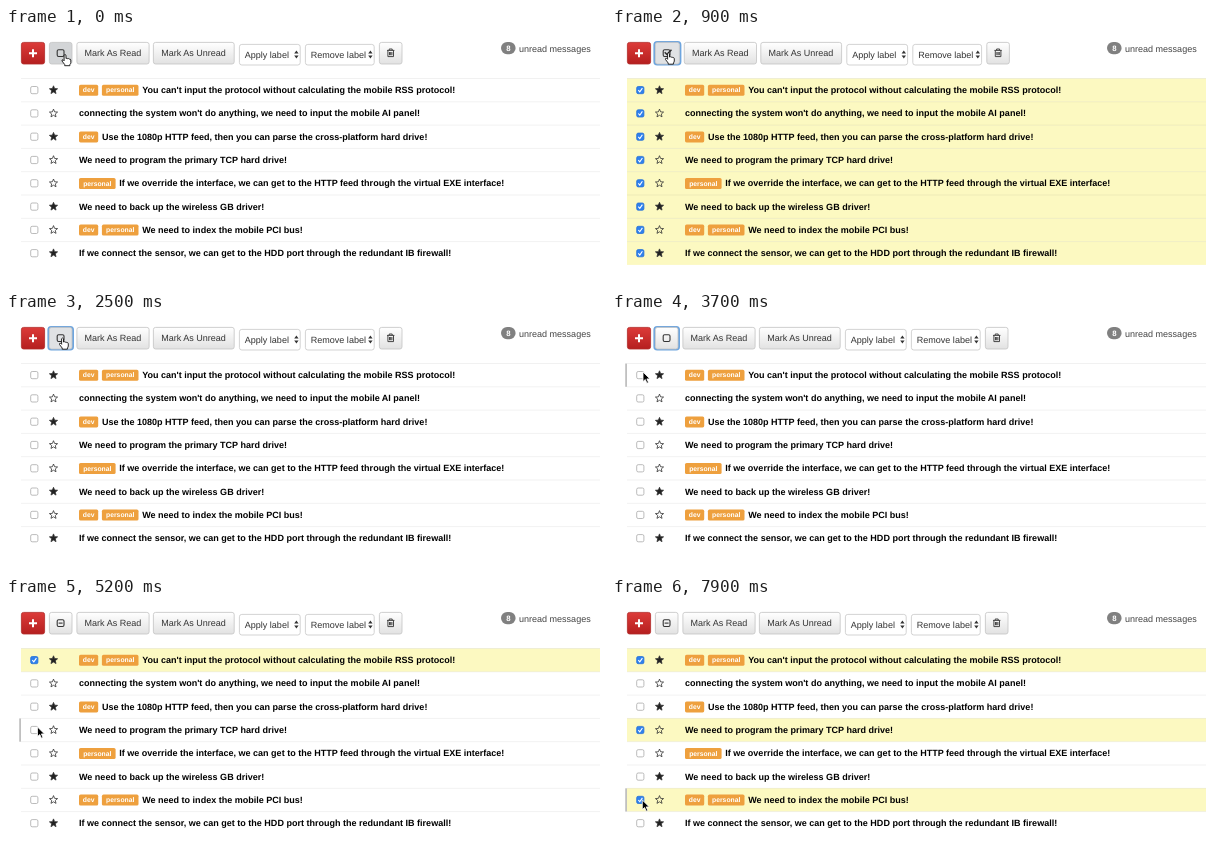
Write an HTML page that moves like this. It is 600 px wide and 257 px high and loops after 8 s.

```html
<!DOCTYPE html>
<html lang="en">
<head>
<meta charset="utf-8">
<title>Inbox</title>
<style>
html, body { margin: 0; width: 100%; height: 100%; overflow: hidden; background: #fff; }
svg { display: block; width: 600px; height: 257px; }
text { font: 9.03px "Liberation Sans", Arial, sans-serif; text-rendering: geometricPrecision; fill: #333; }
.subject { font-weight: bold; fill: #000; }
.tag { font-size: 6.77px; font-weight: bold; fill: #fff; }
.btn { fill: url(#grey); stroke: #c3c3c3; stroke-width: .8; }
.line { fill: none; stroke: #333; stroke-width: 1.1; stroke-linejoin: round; }
</style>
</head>
<body>
<svg viewBox="0 0 600 257">
  <defs>
    <linearGradient id="grey" x2="0" y2="1"><stop stop-color="#fff"/><stop offset="1" stop-color="#e2e2e2"/></linearGradient>
    <linearGradient id="red" x2="0" y2="1"><stop stop-color="#dc3b39"/><stop offset="1" stop-color="#b51f1f"/></linearGradient>
  </defs>
  <rect x="15.4" y="14.4" width="23.2" height="21.6" rx="2.2" fill="url(#red)" stroke="#b02a28" stroke-width=".8"/>
  <path d="M23 25.2h8M27 21.2v8" stroke="#fff" stroke-width="2"/>

  <rect id="ring" x="42.4" y="13.9" height="22.6" rx="2.8" fill="none" stroke="#6ea5de" stroke-width="2"/>
  <rect id="toggle" class="btn" x="43.4" y="14.4" height="21.6" rx="2.2"/>
  <rect class="line" x="51.2" y="21.7" width="6.8" height="6.8" rx="1.4"/>
  <path id="minus" class="line" d="M52.6 25.1h4"/>
  <path id="tick" class="line" style="stroke-width:1.5" d="M52.7 24.2l2.2 2.2 4.6-4.6"/>

  <g id="tools">
    <rect class="btn" x="70.9" y="14.4" width="72.2" height="21.6" rx="2.2"/>
    <text x="78.6" y="28.4">Mark As Read</text>
    <rect class="btn" x="147.4" y="14.4" width="80.8" height="21.6" rx="2.2"/>
    <text x="155.2" y="28.4">Mark As Unread</text>
    <g id="selects"></g>
    <rect class="btn" x="373.4" y="14.4" width="22.6" height="21.6" rx="2.2"/>
    <path class="line" style="stroke-width:.9" d="M381 22.4h7.4M383.2 22.2v-1.2h3v1.2M381.9 22.6v6h5.6v-6M383.5 24v3.2M384.7 24v3.2M385.9 24v3.2"/>
  </g>

  <rect x="495" y="14" width="14.6" height="12.2" rx="6.1" fill="#808080"/>
  <text x="502.3" y="22.9" text-anchor="middle" style="font-size:7.8px;font-weight:bold;fill:#fff">8</text>
  <text x="513" y="24.2" style="fill:#444">unread messages</text>

  <g id="list"></g>
  <rect id="bar" x="13.2" width="1.8" height="23.3" fill="#c0c0c0"/>

  <path id="arrow" d="M0 0v9.6l2.3-2.1 1.6 3.7 1.6-.7-1.6-3.6h3.1z" fill="#000" stroke="#fff" stroke-width=".8"/>
  <path id="hand" d="M-.9.7Q0-.7 1 .7V4q.9-.7 1.7.2 1-.5 1.6.4 1.2-.3 1.5.9V8q-.2 1.3-.9 2v1.2H-.3V10L-3 6.500q-.3-1.500 1.100-1.200l1 1z"
    fill="#fff" stroke="#111" stroke-width=".9" stroke-linejoin="round"/>
</svg>
<script>
const $ = id => document.getElementById(id);
const TOP = 50.5, PITCH = 23.3, LOOP = 8000;

// starred, labels, subject
const messages = [
  [1, "dev personal", "You can't input the protocol without calculating the mobile RSS protocol!"],
  [0, "", "connecting the system won't do anything, we need to input the mobile AI panel!"],
  [1, "dev", "Use the 1080p HTTP feed, then you can parse the cross-platform hard drive!"],
  [0, "", "We need to program the primary TCP hard drive!"],
  [0, "personal", "If we override the interface, we can get to the HTTP feed through the virtual EXE interface!"],
  [1, "", "We need to back up the wireless GB driver!"],
  [0, "dev personal", "We need to index the mobile PCI bus!"],
  [1, "", "If we connect the sensor, we can get to the HDD port through the redundant IB firewall!"]
];
const tagWidth = { dev: 19.2, personal: 36.6 };

const star = Array.from({ length: 10 }, (_, i) => {
  const r = i % 2 ? 1.9 : 4.3, a = i * Math.PI / 5;
  return (47.5 + r * Math.sin(a)).toFixed(2) + "," + (11.6 - r * Math.cos(a)).toFixed(2);
}).join(" ");

function row([starred, labels, subject], i) {
  let x = 73, tags = "";
  for (const name of labels.split(" ").filter(Boolean)) {
    const w = tagWidth[name];
    tags += `<rect x="${x}" y="6.300" width="${w}" height="11" rx="1.6" fill="#eea03e"/>
      <text class="tag" x="${x + w / 2}" y="13.9" text-anchor="middle">${name}</text>`;
    x += w + 3.7;
  }
  return `<g transform="translate(0 ${TOP + i * PITCH})">
    <rect class="back" x="15" width="579" height="${PITCH}"/>
    <path d="M15 0h579" stroke="#000" stroke-opacity=".07" stroke-width=".8"/>
    <rect class="box" x="24.700" y="8" width="7.2" height="7.2" rx="1.5" stroke-width=".8"/>
    <path class="mark" d="M26.300 11.700l1.500 1.700 2.600-3.800" fill="none" stroke="#fff" stroke-width="1.1"/>
    <polygon points="${star}" fill="${starred ? "#222" : "none"}" stroke="#333" stroke-width=".8" stroke-linejoin="round"/>
    ${tags}<text class="subject" x="${x}" y="14.600">${subject}</text>
  </g>`;
}

const select = (x, w, label) => `<rect x="${x}" y="16.4" width="${w}" height="20.6" rx="2.4" fill="#fff" stroke="#c8c8c8" stroke-width=".8"/>
  <text x="${x + 5.4}" y="29.8">${label}</text>
  <path d="M${x + w - 6} 25.6l2.2-3 2.2 3zm0 2l2.2 3 2.2-3z" fill="#333"/>`;

$("selects").innerHTML = select(233.4, 60.8, "Apply label") + select(299.4, 68.8, "Remove label");
$("list").innerHTML = messages.map(row).join("");
const rows = [...$("list").children].map(g => ["back", "box", "mark"].map(c => g.querySelector("." + c)));

// time, x, y of the pointer tip
const path = [
  [0, 59, 26.5], [150, 59, 26.5], [600, 56.500, 25], [2700, 56.500, 25], [3400, 31, 59],
  [4550, 31, 59], [5050, 31.500, 129], [5700, 31.500, 129], [6250, 30, 196.500],
  [6500, 30.300, 197], [6750, 30.300, 202], [LOOP, 30.300, 202]
];
const clicks = { 0: 4150, 3: 5650, 6: 6900 };

function pointer(t) {
  const i = path.findIndex(p => p[0] > t);
  const [t0, x0, y0] = path[i - 1], [t1, x1, y1] = path[i];
  const u = (t - t0) / (t1 - t0), e = u * u * (3 - 2 * u);
  return [x0 + (x1 - x0) * e, y0 + (y1 - y0) * e];
}

const show = (el, on) => el.setAttribute("visibility", on ? "visible" : "hidden");

function draw(t) {
  const [x, y] = pointer(t);
  const all = t >= 150 && t < 2450;
  const some = t >= clicks[0];
  const shift = all ? 1.4 : 0;

  rows.forEach(([back, box, mark], i) => {
    const on = all || t >= clicks[i];
    back.setAttribute("fill", on ? "#fcf9c1" : "#fff");
    box.setAttribute("fill", on ? "#2f80ed" : "#fff");
    box.setAttribute("stroke", on ? "#2871d6" : "#aaa");
    show(mark, on);
  });

  const overToggle = x > 43 && x < 67 && y > 14 && y < 36;
  const pressed = t < 150 || t >= 2200 && t < 2450;
  $("toggle").style.fill = pressed ? "#d3d5d7" : overToggle ? "#e0e2e4" : "";
  $("toggle").setAttribute("width", 22.6 + shift);
  $("ring").setAttribute("width", 24.6 + shift);
  $("tools").setAttribute("transform", `translate(${shift})`);
  show($("ring"), t >= 150 && !some);
  show($("tick"), all);
  show($("minus"), some);

  const hover = Math.floor((y - TOP) / PITCH);
  show($("bar"), hover >= 0);
  $("bar").setAttribute("y", TOP + hover * PITCH);

  const overBox = x > 24 && x < 33 && Math.abs(y - TOP - (hover + .5) * PITCH) < 4.2;
  const hand = overToggle || hover >= 0 && !overBox;
  show($("hand"), hand);
  show($("arrow"), !hand);
  $(hand ? "hand" : "arrow").setAttribute("transform", `translate(${x} ${y})`);
}

function tick() {
  draw(performance.now() % LOOP);
  requestAnimationFrame(tick);
}
tick();
</script>
</body>
</html>
```
